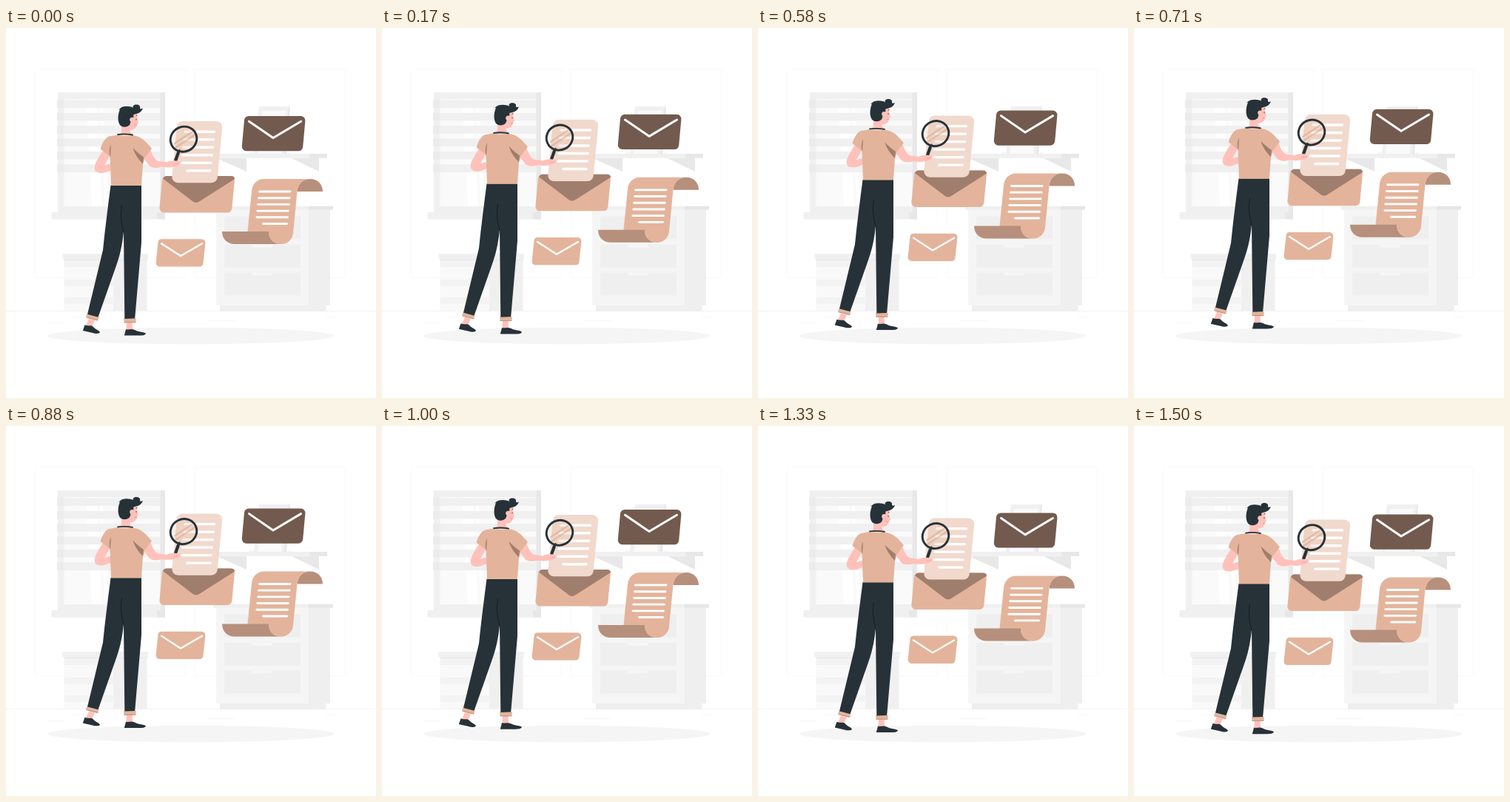
Recreate the animation shown at these times as an HTML page with a canvas. Size 500 by 500 pixels, loop 1.54 s.

```html
<!DOCTYPE html>
<html lang="en">
<head>
<meta charset="utf-8">
<title>Floating mail</title>
<style>
  html, body { margin: 0; width: 100%; height: 100%; overflow: hidden; background: #fff; }
  canvas { display: block; width: 500px; height: 500px; }
</style>
</head>
<body>
<canvas id="stage" width="500" height="500"></canvas>
<script>
const ctx = document.getElementById('stage').getContext('2d');

const LOOP = 1540, STEPS = 37, RISE = 10;
const DARK = '#263238', SKIN = '#ffc1ba', TAN = '#e3b49b', SHADE = '#a07e6d',
      ROLL = '#b6907c', BROWN = '#725a4e', PAPER = '#f1d9cd';

function rect(color, x1, y1, x2, y2) {
  ctx.fillStyle = color;
  ctx.fillRect(x1, y1, x2 - x1, y2 - y1);
}

function shape(color, path) {
  ctx.fillStyle = color;
  ctx.fill(new Path2D(path));
}

function line(color, width, path) {
  ctx.strokeStyle = color;
  ctx.lineWidth = width;
  ctx.lineCap = ctx.lineJoin = 'round';
  ctx.stroke(new Path2D(path));
}

// Rounded parallelogram; the bottom edge is shifted left by skew.
function slanted(color, x1, y1, x2, y2, skew, radius) {
  const pts = [[x1, y1], [x2, y1], [x2 - skew, y2], [x1 - skew, y2]];
  ctx.beginPath();
  ctx.moveTo((x1 + x2) / 2, y1);
  for (const i of [1, 2, 3, 0]) ctx.arcTo(...pts[i], ...pts[(i + 1) % 4], radius);
  ctx.closePath();
  ctx.fillStyle = color;
  ctx.fill();
}

function drawWindow() {
  rect('#f0f0f0', 70, 87, 215, 250);
  rect('#e8e8e8', 209, 87, 215, 250);
  rect('#fafafa', 78.5, 96, 208, 241);
  shape('#fff', 'M108 96H122L130 241H116Z M126 96H130L138 241H134Z');
  for (let i = 0; i < 6; i++) {
    const y = 97.3 + i * 17.4;
    rect('#f0f0f0', 69, y, 208.5, y + 10.6);
    rect('#ebebeb', 69, y, 78.5, y + 10.6);
  }
  rect('#f0f0f0', 61.5, 249, 204, 258.7);
  rect('#e7e7e7', 204, 249, 215, 258.7);
}

function drawLeftCabinet() {
  rect('#f9f9f9', 78.5, 313, 145, 382);
  rect('#f0f0f0', 145, 313, 190.5, 382);
  for (const y of [323, 349, 373]) rect('#f3f3f3', 78.5, y - 9, 145, y);
  rect('#f0f0f0', 76.5, 305, 192, 312.5);
  rect('#e8e8e8', 78.5, 312.5, 190.5, 314);
}

function drawShelf() {
  shape('#e8e8e8', 'M285 176H325V194Z M386 176H423V194Z');
  rect('#f0f0f0', 286, 170, 410, 175.8);
  rect('#e7e7e7', 410, 170, 434, 175.8);
  rect('#f8f8f8', 329, 167.5, 386, 170);
  shape('#e8e8e8', 'M378 106H384L379 170H373Z');
  shape('#f0f0f0', 'M342 106H382L376 170H335Z');
  shape('#fafafa', 'M346 112H378L372 170H340Z');
}

function drawRightCabinet() {
  rect('#f5f5f5', 284, 245.5, 409, 375);
  rect('#efefef', 409, 245.5, 438, 375);
  rect('#f0f0f0', 280, 240.7, 409, 245.7);
  rect('#e6e6e6', 409, 240.7, 442, 245.7);
  rect('#efefef', 289, 375, 432.5, 383);
  for (const y of [254.5, 292.8, 330.5]) {
    rect('#efefef', 295, y, 398, y + 31);
    rect('#f6f6f6', 332, y, 360, y + 4);
  }
}

function drawRoom() {
  ctx.strokeStyle = '#f9f9f9';
  ctx.lineWidth = 1;
  for (const x of [39.5, 255.5]) {
    ctx.beginPath();
    ctx.roundRect(x, 55.5, 203, 282, 3);
    ctx.stroke();
  }
  rect('#f3f3f3', 0, 382, 500, 383);
  for (const [x1, x2, y] of [[57, 80, 398], [88, 110, 390], [273, 312, 395], [432, 448, 390]])
    rect('#f8f8f8', x1, y, x2, y + 1);
  drawWindow();
  drawLeftCabinet();
  drawShelf();
  drawRightCabinet();
  ctx.fillStyle = '#f5f5f5';
  ctx.beginPath();
  ctx.ellipse(249.5, 416, 194, 11.3, 0, 0, 7);
  ctx.fill();
}

function drawScroll() {
  shape(ROLL, 'M393.5 221C394 211 401 204 411 204C421 204 428 211 428 221Z');
  shape(TAN, 'M349 204H411C401 204 394.5 211 393.5 221L388 277C387 286 380 292 371 292L326.5 275L332 220C333 210 340 204 349 204Z');
  shape(ROLL, 'M292 275H355C355 285 362 292 372 292H309C299 292 292 285 292 275Z');
  shape(TAN, 'M355 275H388C387.5 285 381 292 371 292C361 292 354.5 285 355 275Z');
  for (let i = 0; i < 6; i++) {
    const y = 221 + i * 8.7, left = i === 5 ? 347.5 : 342.5 - i * 0.9;
    line('#fff', 2.9, `M${left} ${y}H${384 - i * 0.9}`);
  }
}

function drawMail() {
  slanted(BROWN, 322.5, 119, 405, 166.2, 4.3, 6);
  line('#fff', 3, 'M328.5 126.2L361 148.5L398.5 126.2');

  slanted(TAN, 206, 285.2, 270, 322.5, 4, 5);
  line('#fff', 2.3, 'M210 291.2L236 308L265 291.2');

  slanted(TAN, 211.5, 200, 309.5, 249.5, 4.7, 6);
  shape(SHADE, 'M212 203.5C213 201 215 200 217 200H304C307 200 309 201 309 204L262 234C258 236.5 255 236.5 252 234Z');
  slanted(PAPER, 231.5, 126, 293, 209.2, 8, 8);
  const starts = [242, 241, 240, 239, 238, 245];
  starts.forEach((x, i) => line('#fff', 3.4, `M${x} ${140.2 + i * 10.5}H${281.5 - i * 1.1}`));
}

function drawLegs() {
  shape(SKIN, 'M112 393L120 395L116 404L108 402Z M163 397H170.5L171 408H162.5Z');
  shape(DARK, 'M106.5 401.3C110 403 114 401.5 117 403C120 407 125 408 127 411C126 413.5 121 413.3 117 412L103.8 409Z');
  shape(DARK, 'M162 407.3C166 408 170 406 174 408C179 411 186 410.5 189 412.8C188 415.8 183 415.6 179 415.6H159.8Z');
  shape(TAN, 'M109 387L125.5 391L124 395.5L108 391.5Z M159 392.5H176L175.3 398L159.5 398.2Z');
  shape(DARK, 'M141.5 212.5H183V290L174.2 392.5L160.3 393L159 275C157 296 153 310 148 324L124.5 390.8L110 387L131 300C134 270 138 240 141.5 212.5Z');
  line('#10191d', 0.8, 'M156.5 240C154 254 156 264 159 276');
  line(SHADE, 0.7, 'M110 391.5L124 395 M160 397.8H175');
}

function drawBody() {
  shape(SKIN, 'M132 164C126 174 119 183 119.7 190C120.5 196 128 197 134 195L142.5 192V183L133 185.5L141 171Z');
  shape(SKIN, 'M156 130H168L167.5 140L172 145H151L156 141Z');
  shape(TAN, 'M150 144.7L139 146.5C133 149.5 130 156 127.5 163.5L140.5 173.5L142 213H183L185 184L187.5 176.5L197 162.7C190 155 184 146.5 171.5 145C164 146 157 146 150 144.7Z');
  shape(SHADE, 'M142 157C139.5 163 139 169 141 175Z M171.5 162C176 167 181 171 186 174.5L184.8 183.5C179 177 174 171 171.5 162Z');
  line(DARK, 1.8, 'M151 144C157 143.2 164 143.2 171 144.5');
}

function drawHead() {
  shape(SKIN, 'M165 117L177 113.5C177.5 117 177.3 120 177.3 122L179 128L177 130C177 135 173 138 166.5 138L159 134Z');
  line('#e78e87', 1, 'M174.5 131.2L176.6 130.6');
  line(DARK, 0.9, 'M176 118.5L177 118 M176 123V124');
  shape(DARK, 'M154 110C151 117 150.5 126 154 131C157 135 164 134.5 167.3 130.5L168.5 127C165.5 123 168 119.5 172.3 121V117C177 116 183 115 185 108.3C183 109.6 181.2 109.6 181 108C182 104 177 102.7 173.5 104C171 105 171.2 107.5 173 108.3C167 104.8 158 105.3 155 108L152 110.4Z');
}

function drawLens() {
  ctx.save();
  ctx.beginPath();
  ctx.arc(240, 150, 17.5, 0, 7);
  ctx.fillStyle = 'rgba(227,180,155,.22)';
  ctx.fill();
  ctx.clip();
  line('rgba(214,166,142,.55)', 2.2, 'M228 156L252 140 M230 161L256 144');
  ctx.restore();
  line(DARK, 2, 'M234.5 165L233 169');
  line(DARK, 4.2, 'M232.7 169L229.3 178.5');
  ctx.strokeStyle = DARK;
  ctx.lineWidth = 2.9;
  ctx.beginPath();
  ctx.ellipse(240, 150.2, 18, 16.8, -0.45, 0, 7);
  ctx.stroke();
}

function drawArm() {
  shape(SKIN, 'M195.5 165C198 172 201 178 205.5 179.7L217 181.5C222 179 229 178.6 235 180.5C236 184 233 187 228 187C222 189 215 188.6 211 187.5C204 189.5 198 189.5 194 186.5L186.5 176.5Z');
  line('#f3a39c', 0.7, 'M227 183.8L233.5 183.5');
}

function draw(now) {
  const step = Math.floor((now % LOOP + 4) * 24 / 1000) % STEPS;
  const phase = ((step + 1) % STEPS) / STEPS;
  const lift = RISE * (1 - Math.abs(1 - 2 * phase));

  rect('#fff', 0, 0, 500, 500);
  drawRoom();
  ctx.save();
  // The resting pose sits one step above the lowest point.
  ctx.translate(0, 2 * RISE / STEPS - lift);
  drawScroll();
  drawMail();
  drawLegs();
  drawBody();
  drawHead();
  drawLens();
  drawArm();
  ctx.restore();
}

const start = performance.now();
function tick() {
  draw(performance.now() - start);
  requestAnimationFrame(tick);
}
tick();
</script>
</body>
</html>
```
